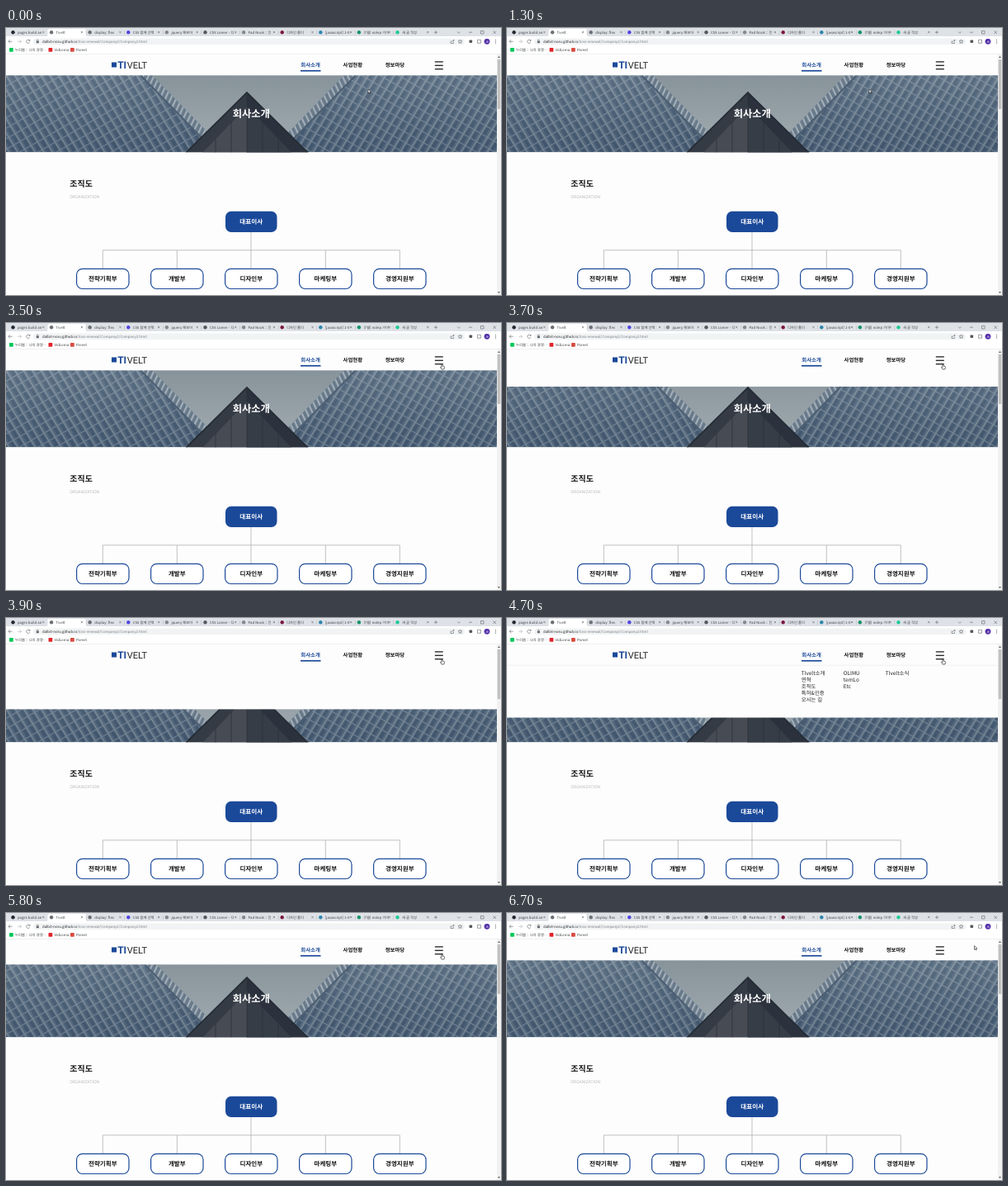
An HTML page that plays this animation: 600 px wide and 323 px high, repeating every 6.8 s.

```html
<!DOCTYPE html>
<html lang="ko">
<head>
<meta charset="utf-8">
<title>Tivelt</title>
<style>
  html, body { margin: 0; width: 100%; height: 100%; overflow: hidden; background: #fdfdfd; }
  svg { display: block; width: 100vw; height: 100vh; }
  text { font-family: "Noto Sans CJK KR", "Noto Sans CJK", "Noto Sans", sans-serif; text-rendering: geometricPrecision; }
  .b { font-weight: 700; }
  .m { text-anchor: middle; }
  .logo { font-family: Roboto, sans-serif; }
  .ico { fill: none; stroke: #5f6368; stroke-width: .6; }
</style>
</head>
<body>
<svg id="stage" viewBox="0 0 600 323" preserveAspectRatio="none"></svg>
<script>
const LOOP = 6800, BLUE = '#1b4999', PAGE = '#fdfdfd', TOP = 57, OPEN = 120.5;
const stage = document.getElementById('stage');

const rect = (x, y, w, h, fill, extra = '') =>
  `<rect x="${x}" y="${y}" width="${w}" height="${h}" fill="${fill}" ${extra}/>`;
const text = (x, y, size, str, fill = '#111', cls = '') =>
  `<text x="${x}" y="${y}" font-size="${size}" fill="${fill}" class="${cls}">${str}</text>`;
const icon = (d, extra = '') => `<path class="ico" d="${d}" ${extra}/>`;
const dot = (x, y, r, fill) => `<circle cx="${x}" cy="${y}" r="${r}" fill="${fill}"/>`;

function browser() {
  const tabs = [
    ['pages build an', '#24292f'], ['Tivelt', '#6b7075'], ['display: flex', '#6b7075'],
    ['CSS 함께 선택', '#5146e0'], ['jquery 해보아', '#85898e'], ['CSS Lomer - 디', '#55585c'],
    ['Pad Nook :: 진', '#85898e'], ['디자인 폴더', '#7c1740'], ['[javascript] 1-0', '#2d86ad'],
    ['(7월) nolep 가이', '#149268'], ['새 글 작성', '#20c997']
  ];
  let s = rect(0, 0, 600, 11, '#dee1e6') + rect(0, 10, 600, 22, '#fff') +
    '<path d="M49 10.5Q50.5 10 50.5 8V3Q50.5 1 52.5 1H95Q97 1 97 3V8Q97 10 98.5 10.5Z" fill="#fff"/>';
  tabs.forEach(([name, color], i) => {
    const x = 8.5 + i * 46.6;
    s += dot(x, 5.2, 2.2, color) + text(x + 5.5, 6.9, 4.25, name, '#3c4043');
    s += icon(`M${x + 35.7} 4l2.2 2.2m0-2.2l-2.2 2.2`);
    if (i > 1) s += rect(x - 4.8, 3, .4, 5, '#a5a9ae');
  });
  s += icon('M519 5.2h4M521 3.2v4M547 4.5l1.8 1.8 1.8-1.8M561 5.2h4M575.5 3.5h3.5v3.5h-3.5zM590.5 3.5l3.5 3.5m0-3.5l-3.5 3.5');
  s += rect(33, 12.5, 523, 7.8, '#f1f3f4', 'rx="3.9"');
  s += icon('M7.5 16.3H3M5 14.2L3 16.3l2 2.1M28.8 15.2a2.2 2.2 0 1 0 .1 2M29 13.8v1.7h-1.7');
  s += icon('M14 16.3h4.5M16.5 14.2l2 2.1-2 2.1', 'opacity=".5"');
  s += rect(36.8, 15.8, 3, 2.4, '#5f6368') + icon('M37.3 16v-.8a1 1 0 0 1 2 0v.8');
  s += text(44, 17.9, 4.3, 'dalbit-noru.github.io<tspan fill="#777b80">/toss-renewal/Company2/Company2.html</tspan>', '#202124');
  s += icon('M539 15.5v3h3.5v-1.5M540 17q.5-2 3-2M542 13.8l1.3 1.2-1.3 1.2M550.5 14l.7 1.5 1.7.2-1.3 1.1.4 1.7-1.5-.9-1.5.9.4-1.7-1.3-1.1 1.7-.2z');
  s += rect(561.5, 14.5, 3.6, 3.6, '#55585c', 'rx=".8"') + icon('M571.5 14.3h4v4h-4z');
  s += dot(583, 16.3, 3.4, '#512da8') + text(583, 17.7, 3.5, 'JK', '#fff', 'm');
  s += [14.5, 16.3, 18.1].map(y => dot(593.5, y, .55, '#5f6368')).join('');
  const marks = [[4, '#03c75a', '누리봄 :: 나의 경쟁…'], [51.5, '#e3242b', 'VidLoma'], [78, '#d94b40', 'Pomel']];
  marks.forEach(([x, color, name]) => {
    s += rect(x, 24, 4.8, 4.8, color, 'rx=".8"') + text(x + 7, 28, 4.3, name, '#3c4043');
  });
  return s + rect(0, 31.3, 600, .5, '#dcdee1');
}

// Two mirrored towers around a dark gable
function hero() {
  const wall = 'M-8 57H163L254 150H-8Z', side = 'M163 57H177L268 150H254Z';
  const tower = `<path d="${wall}" fill="url(#panes)"/><path d="${wall}" fill="url(#shade)"/>
    <path d="${side}" fill="#68798a"/><path d="${side}" fill="url(#slats)"/>
    <path d="M163 57L254 150" stroke="#4b5e72" stroke-width="2"/>`;
  return `<defs>
    <linearGradient id="sky" x2="0" y2="1"><stop stop-color="#87939a"/><stop offset="1" stop-color="#a3adb2"/></linearGradient>
    <linearGradient id="shade" x2="0" y2="1"><stop stop-color="#8796a3" stop-opacity=".3"/><stop offset="1" stop-color="#20344b" stop-opacity=".22"/></linearGradient>
    <pattern id="panes" width="11" height="9" patternUnits="userSpaceOnUse" patternTransform="matrix(.52 .86 .87 -.5 0 57)">
      ${rect(0, 0, 11, 9, '#8595a3') + rect(1.2, 1.3, 9.8, 6.6, '#485e75') + rect(1.2, 1.3, 9.8, 2, '#5c7187')}
    </pattern>
    <pattern id="slats" width="6" height="6" patternUnits="userSpaceOnUse" patternTransform="rotate(25)">
      ${rect(0, 0, 2.2, 6, '#a3afb8')}
    </pattern>
    <clipPath id="frame"><rect y="57" width="595" height="93.2"/></clipPath></defs>
    <g clip-path="url(#frame)">${rect(0, 57, 595, 94, 'url(#sky)')}
    ${tower}<g transform="matrix(-1 0 0 1 587 0)">${tower}</g>
    <path d="M292 78L218 151H366Z" fill="#343b45"/>
    <path d="M292 78L366 151H292Z" fill="#2b323d"/>
    <path d="M292 95L238 151H346Z" fill="#464b54"/>
    <path d="M292 95L346 151H292Z" fill="#363d47"/>
    <path d="M218 151L292 78L366 151" fill="none" stroke="#252c36" stroke-width="1.8"/>
    <path d="M292 79V151M273 114V151M254 134V151M311 114V151M330 134V151" stroke="#2b323c" stroke-width=".8"/></g>` +
    text(297.3, 108, 12.3, '회사소개', '#fff', 'b m');
}

function chart() {
  const names = ['전략기획부', '개발부', '디자인부', '마케팅부', '경영지원부'];
  let s = text(77.3, 192.2, 10, '조직도', '#111', 'b') + text(77.3, 205.9, 5, 'ORGANIZATION', '#b9b9b9');
  s += '<path d="M297 247V291M117.3 291V268.8H477.3V291M207.3 269V291M387.3 269V291" fill="none" stroke="#a8a8a8" stroke-width=".7"/>';
  s += rect(266, 221.8, 62.5, 25.2, BLUE, 'rx="7"') + text(297.3, 237.3, 7.6, '대표이사', '#fff', 'b m');
  names.forEach((name, i) => {
    const x = 117.3 + i * 90;
    s += rect(x - 31.7, 291.3, 63.4, 24.2, '#fff', `rx="7" stroke="${BLUE}" stroke-width="1.2"`);
    s += text(x, 306.3, 7.5, name, '#111', 'b m');
  });
  return s;
}

function header() {
  let s = rect(0, 32, 595, 25.3, PAGE) + rect(128, 41.5, 6, 6, BLUE);
  s += text(135.2, 48.9, 12, 'TI', BLUE, 'b logo') + text(146.8, 48.9, 11, 'VELT', '#222', 'logo');
  ['회사소개', '사업현황', '정보마당'].forEach((name, i) => {
    s += text(357.3 + i * 51.2, 47.3, 6.4, name, i ? '#111' : BLUE, 'b');
  });
  s += rect(357, 50.9, 24.5, 1.7, BLUE);
  return s + [40.3, 44.7, 49.1].map(y => rect(519.8, y, 10, 1.2, '#111')).join('');
}

function menu() {
  const cols = [['TIvelt소개', '연혁', '조직도', '특허&amp;인증', '오시는 길'], ['OLIMU', 'temLo', 'Etc'], ['TIvelt소식']];
  return rect(0, 56.8, 595, .6, '#e4e4e4') + cols.map((names, c) =>
    names.map((str, r) => text(356.8 + c * 51, 68.8 + r * 8.1, 6.4, str, '#222')).join('')).join('');
}

stage.innerHTML = rect(0, 0, 600, 323, PAGE) + hero() + chart() +
  rect(0, TOP, 595, 0, PAGE, 'id="panel"') + header() + `<g id="items">${menu()}</g>` + browser() +
  rect(595, 32, 5, 291, '#f1f1f1') + rect(595.7, 38, 3.6, 60, '#c1c1c1') +
  '<path d="M596 36l1.5-2 1.5 2zM596 319l1.5 2 1.5-2z" fill="#606060"/>' +
  `<path id="arrow" d="M0 0V4.8L1.1 3.8 1.9 5.5 2.7 5.1 1.9 3.5H3.4Z" fill="#fff" stroke="#111" stroke-width=".55"/>
   <path id="hand" d="M-.6-2.5Q0-3.2 .5-2.5V-.5L2.6 0Q3.2.3 3 1.2L2.4 3.5H-.5L-2 1Q-1.9.3-.6 1Z" fill="#fff" stroke="#111" stroke-width=".6"/>`;

const [panel, items, arrow, hand] = ['panel', 'items', 'arrow', 'hand'].map(id => document.getElementById(id));

// time, x, y
const path = [[0, 439, 74], [1500, 439, 74], [2400, 486, 109], [2600, 486, 109], [3400, 528.5, 52.5],
  [5900, 528.5, 52.5], [6200, 552, 45], [6400, 552, 45], [6700, 566.5, 39.5], [LOOP, 566.5, 39.5]];

const ramp = (t, from, len) => Math.min(1, Math.max(0, (t - from) / len));

// CSS "ease" curve: cubic-bezier(.25, .1, .25, 1)
function ease(p) {
  let lo = 0, hi = 1, u = .5;
  for (let i = 0; i < 20; i++) {
    u = (lo + hi) / 2;
    const x = .75 * u * (1 - u) ** 2 + .75 * u * u * (1 - u) + u ** 3;
    if (x < p) lo = u; else hi = u;
  }
  return .3 * u * (1 - u) ** 2 + 3 * u * u * (1 - u) + u ** 3;
}

function draw(t) {
  const open = ease(ramp(t, 3575, 600)) - ease(ramp(t, 5410, 600));
  panel.setAttribute('height', Math.max(0, (OPEN - TOP) * open));
  items.setAttribute('opacity', ramp(t, 4150, 250) - ramp(t, 5150, 250));

  const k = path.findIndex(p => p[0] > t);
  const [t0, x0, y0] = path[k - 1], [t1, x1, y1] = path[k];
  const p = (t - t0) / (t1 - t0), q = p * p * (3 - 2 * p);
  const x = x0 + (x1 - x0) * q, y = y0 + (y1 - y0) * q;
  const over = t >= 3300 && t < 6000;
  hand.setAttribute('visibility', over ? 'visible' : 'hidden');
  arrow.setAttribute('visibility', over ? 'hidden' : 'visible');
  (over ? hand : arrow).setAttribute('transform', `translate(${x} ${y})`);
}

const start = performance.now();
function tick() {
  const t = (performance.now() - start) % LOOP;
  draw(Math.floor(t / 100) * 100);
  requestAnimationFrame(tick);
}
tick();
</script>
</body>
</html>
```
